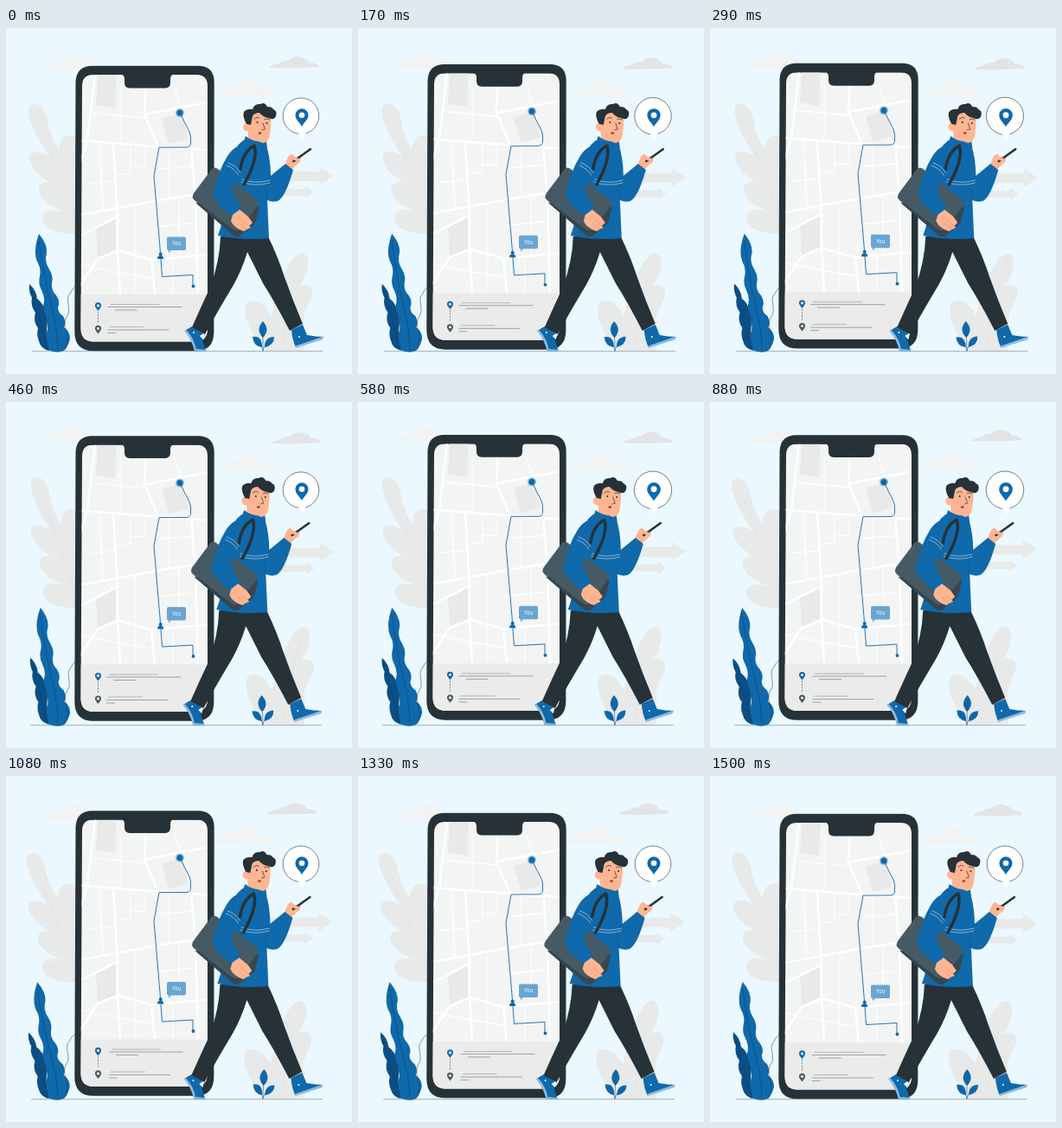
These frames come from a looping animation (400x400 px, 1.54 s). An HTML page:

```html
<!DOCTYPE html>
<html lang="en">
<head>
<meta charset="utf-8">
<title>Walking with a map</title>
<style>
  html, body { margin: 0; width: 100%; height: 100%; overflow: hidden; background: #ebf8ff; }
  svg { display: block; width: 100%; height: 100%; }
  .grey { fill: #e8e9e9; }
  .pale { fill: #f2f3f3; }
  .dark { fill: #263238; }
  .blue { fill: #0f69aa; }
  .skin { fill: #ffb592; }
  .line { fill: none; stroke: #263238; stroke-width: .7; stroke-linecap: round; stroke-linejoin: round; }
  .white { stroke: #fff; }
  .vein { fill: none; stroke: #dcdfe0; stroke-width: .5; }
</style>
</head>
<body>
<svg viewBox="0 0 400 400">
  <defs>
    <clipPath id="screen"><path d="M101 54H220Q233 54 233 67V347Q233 362.500 219 362.500H101Q86.500 362.500 86.500 347L88 67Q88 54 101 54Z"/></clipPath>
    <path id="pin" d="M0 10C-3 5-7.5 2-7.5-3a7.5 7.5 0 0 1 15 0C7.5 2 3 5 0 10ZM0-6.3a3.3 3.3 0 1 0 0 6.600a3.300 3.300 0 0 0 0-6.600Z" fill-rule="evenodd"/>
  </defs>

  <g class="grey">
    <path id="cloudLeft" class="pale" d="M40 47.500Q48 41 58 40Q62 35 70 36Q78 28 88 32Q94 33 96 39Q104 40 105 45L92 48Z"/>
    <path id="cloudMid" class="pale" d="M243 79Q247 73 255 72Q258 65 267 65Q273 57 283 60Q292 61 295 69Q309 70 314 77Q290 80 243 79Z"/>
    <path id="cloudRight" d="M304 46Q307 42 316 41Q320 37 326 38Q333 31 341 34Q347 34 350 40Q360 40 362 45Q335 47 304 46Z" fill="#e2e4e5"/>
    <path id="arrows" d="M300 166H362V160L378 171L362 182V177H300ZM300 186H346V183L355.500 190L346 197V194H300Z"/>
    <g id="leafBack">
      <path d="M90 238C62 240 38 232 43 217C46 208 60 211 68 212C46 206 34 191 39 182C45 174 60 181 68 185C44 179 23 158 28 147C33 140 44 145 51 149C36 130 22 100 27 91C32 84 44 90 47 103C50 119 54 130 61 141C62 128 70 121 80 125L90 150Z"/>
      <path class="vein" d="M34 96Q51 145 85 232M34 150Q54 161 63 179M45 186Q66 197 76 210M48 219Q68 222 83 232"/>
    </g>
    <g id="leafRight">
      <path d="M300 373C280 352 271 324 280 317C292 311 300 322 307 333C312 310 325 262 342 260C354 262 350 286 338 299C350 292 358 301 353 312C348 324 342 331 345 345L345 373Z"/>
      <path class="vein" d="M342 266Q326 310 320 370M350 302Q333 318 324 345M284 322Q299 350 317 370"/>
    </g>
  </g>

  <path class="line" id="ground" stroke-opacity=".55" d="M30 373.700H366"/>

  <g id="phone">
    <path class="dark" d="M100 43.700H222Q240.700 43.700 240.700 63L240.300 352Q240 373.300 219 373.300H101Q79.300 373.300 79.300 351L80.500 63Q81 43.700 100 43.700Z"/>
    <g clip-path="url(#screen)">
      <path d="M86 54H233V363H86Z" fill="#f3f4f4"/>
      <path d="M106 54H128L126 93L104 89ZM180 105L203 98L215 127L188 134ZM104 231L127 219V258L106 265Z" fill="#e8e9e9"/>
      <path class="line white" style="stroke-width:2.600" d="M103 54L94 130L86 155M86 130L174 137L233 141M124 133L129 220V256L132 308M86 216L172 200L233 190M86 240L129 218M129 257L168 268L233 262M162 54L160 100L176 137M160 100L233 86M86 297L106 267L129 257M214 135L219 200L222 308M168 268L172 308"/>
      <path class="line white" style="stroke-width:1.200" d="M132 69V133M98 98L160 104M144 136V168L126 170M144 160H160V138M176 163L216 160M188 140V198M150 204V262M172 230L220 225M200 194V264M195 70L204 97L214 135M95 180L127 177M108 132L112 211M86 274L129 283L172 290M193 265V308M150 264V306"/>
      <path d="M86 308H233V363H86Z" fill="#ebebeb"/>
    </g>
    <path class="dark" d="M132 53H195Q190 54 190 59V63Q190 69.500 184 69.500H143Q137 69.500 137 63V59Q137 54 132 53Z"/>
    <path class="line" style="stroke:#0f69aa;stroke-width:.9" d="M201 98L212.500 121Q214 125 213.500 134Q213 138 208 138H177L171 171L178.500 260L180.500 287.500L216 285.500V298"/>
    <circle class="blue" cx="201" cy="98" r="5" opacity=".4"/>
    <circle class="blue" cx="201" cy="98" r="3.500"/>
    <circle class="blue" cx="216.500" cy="298.500" r="1.900"/>
    <g class="blue"><circle cx="178.700" cy="261.500" r="2"/><path d="M175 267Q175 263 178.700 263Q182 263 182.300 267Z"/></g>
    <path fill="#6aa5d1" d="M188 241.500H206Q208 241.500 208 243.500V255Q208 257 206 257H191L188 260V257Q186 257 186 255V243.500Q186 241.500 188 241.500Z"/>
    <text x="197" y="251.400" font-family="Inter, sans-serif" font-size="5.600" text-anchor="middle" fill="#fff">You</text>
    <use href="#pin" class="blue" transform="translate(106.500 322.300) scale(.47)"/>
    <use href="#pin" transform="translate(106.500 348.800) scale(.47)" fill="#455a64"/>
    <path class="line" style="stroke-width:.5" stroke-dasharray="1.500 2" d="M106.500 328V342"/>
    <g id="notes" class="line" style="stroke-width:.5" opacity=".8">
      <path stroke="#3a6d94" d="M121 319.500H177M120 345.500H159"/>
      <path d="M118 322.500H203M126 326H151M118 349H188M118 352.500H127"/>
    </g>
  </g>

  <g id="plant">
    <path class="blue" d="M38 238Q48 250 47 260Q44 270 50 279Q55 287 53 295Q52 303 58 309Q63 316 60 323Q60 329 66 333Q70 340 67 346Q74 351 74 359Q72 368 67 373Q58 377 49 372Q44 363 47 352Q50 344 45 335Q40 329 43 321Q46 313 41 303Q37 296 39 287Q41 278 36 270Q31 258 38 238Z"/>
    <path fill="#0c4f84" d="M27 296Q35 303 36 313Q44 319 44 327Q49 337 47 349Q46 361 50 373Q40 371 38 362Q35 355 37 347Q31 339 34 329Q28 321 30 312Q26 305 27 296Z"/>
    <path class="line" style="stroke:#0a3c68;stroke-width:.5" d="M38 246Q44 290 52 320T60 372M29 303Q40 337 48 372"/>
    <path class="line" style="stroke-width:.5" d="M68 372C77 357 63 346 70 334C77 325 67 314 74 307Q76 302 80 299"/>
  </g>
  <g id="sprout" class="blue">
    <path d="M297 339Q306 349 297 358Q288 349 297 339ZM285 357Q296 355 296 369Q286 368 285 357ZM310 357Q310 367 299 369Q299 357 310 357Z"/>
    <path class="line" style="stroke:#0c4f84;stroke-width:.5" d="M297 346V373M288 360Q296 365 297 373M307 361Q298 366 297 373"/>
  </g>

  <g id="man">
    <path class="blue" d="M206.500 350L215 345L230 354L227 361L231 373.500H218Q215 360 206.500 350ZM330 349L343 343L348 355Q358 357 367 357L365 360L335 369Q331 361 330 349Z"/>
    <path fill="#fff" d="M224 356L230 352L228 360Z"/>
    <path fill="#8dbbe0" d="M206.500 350L208.500 349Q218 360 219.500 371L231 372V373.500H218Q215 361 206.500 350ZM335 367.500L367 356.500L366 360L335 370Z"/>
    <g fill="#fff"><circle cx="217" cy="352" r="1"/><circle cx="339" cy="357" r="1"/></g>
    <path class="dark" d="M248 241H303Q315 266 322 288Q332 316 343 342L328 350Q311 317 297 295L279 259Q273 279 263 297Q245 327 230 354L215 346Q226 321 236 300Q247 270 248 241Z"/>

    <g id="hand">
      <path class="skin" d="M321 161L325 152Q327 145 331 146L334 149L341 150L340 155L335 159L330 164Z"/>
      <path class="line" style="stroke-width:2.600" d="M332.500 154L352 140"/>
      <path class="skin" d="M333 149.500L340 151L337 153.500L333 153Z"/>
    </g>
    <path class="blue" d="M274 130L300 133Q306 150 306 171L323 157L332 164Q323 196 314 200Q308 202 302 199L304 243Q275 246 245 240Q252 222 252 202L258 158Q263 138 274 130Z"/>
    <path class="line" style="stroke:#0c4f84;stroke-width:.5" d="M306 171L299 181M302 199L300 186"/>
    <path class="line white" style="stroke-width:.5" d="M273 175Q288 181 305 176M272 178Q288 184 305 179"/>

    <path class="skin" d="M280 112L280 129Q290 138 299 132L299 122Z"/>
    <path class="blue" d="M277 125Q287 133 301 131L302 139Q287 141 274 133Z"/>
    <path class="skin" d="M282 97Q294 94 306 102Q307 112 305 123Q304 132 297 133Q286 130 282 119Q275 121 274 114Q275 108 281 111Z"/>
    <path class="dark" d="M278 111Q273 102 275 97Q279 93 285 94Q287 87 294 88Q299 85 302 91Q308 91 309 94Q314 96 312 102Q310 107 303 104Q297 103 293 98Q287 98 285 102L283 112Z"/>
    <path class="line" d="M287 105Q290 102 293 104M299 105.500Q302 104 305 106M297 110L299.500 117L296 118"/>
    <g class="dark"><circle cx="290.500" cy="109" r="1"/><circle cx="301.500" cy="110" r="1"/></g>
    <ellipse cx="293.500" cy="121.500" rx="1.800" ry="1.300" fill="#8d3f3a"/>

    <path fill="#37474f" d="M219 202L262 239Q266 243 271 240L288 226L293 207Z"/>
    <path fill="#455a64" d="M217 191L238 163Q241 160 245 163L290 198Q294 202 291 207L271 233Q267 237 262 233L218 199Q214 196 217 191Z"/>
    <path class="line" style="stroke-width:.5" d="M218 199L262 234Q267 237 271 233L291 206"/>
    <path class="blue" d="M268 137Q276 144 274 157Q271 174 261 187L272 209L262 218Q242 204 239 192Q245 166 256 148Q261 140 268 137Z"/>
    <path class="line" style="stroke-width:3.500" d="M271 163Q274 143 287 136Q292 151 275 181"/>
    <path class="line white" style="stroke-width:.5" d="M257 156Q266 159 271 167M255 159Q264 162 269 170"/>
    <path class="skin" d="M262 216L270 210L280 218L285 225L281 229Q285 231 280 232L275 235Q263 231 260 223Z"/>
    <path class="line" style="stroke:#d97f66;stroke-width:.5" d="M273 222L281 229M270 226L278 233"/>
  </g>

  <g id="bubble">
    <circle cx="341" cy="101.700" r="20.800" fill="#fff" stroke="#263238" stroke-width=".6"/>
    <path d="M337 120.500L343 129L347 120Z" fill="#fff"/>
    <use href="#pin" class="blue" x="342" y="103.800"/>
  </g>
</svg>
<script>
const LOOP = 1540;
const move = (id, transform) => document.getElementById(id).setAttribute('transform', transform);
const shift = (id, x, y = 0) => move(id, `translate(${x} ${y})`);
const turn = (id, angle, x, y) => move(id, `rotate(${angle} ${x} ${y})`);

// Linear value between [time, value] pairs
function tween(keys, t) {
  const i = keys.findIndex(([time]) => time > t);
  const [t0, a] = keys[i - 1], [t1, b] = keys[i];
  return a + (b - a) * (t - t0) / (t1 - t0);
}

const lift = [[0, 0], [720, -7], [1440, 0], [LOOP, 0]];
const stride = [[0, 0], [290, 1.3], [460, -1.7], [710, -2.8], [1080, -.6], [1330, -.4], [LOOP, 0]];
const pulse = [[0, 1], [290, 1.035], [460, 1], [710, 1.085], [1080, 1], [LOOP, 1]];

function draw(now) {
  const t = now % LOOP;
  const wave = Math.sin(t / LOOP * 2 * Math.PI);
  const walk = tween(stride, t);

  shift('phone', 0, tween(lift, t));
  shift('notes', -1.5 * wave);
  shift('man', walk);
  shift('ground', walk * .8);
  move('bubble', `translate(341 101.7) scale(${tween(pulse, t)}) translate(-341 -101.7)`);
  shift('cloudLeft', 0, -2 * wave);
  shift('cloudMid', 3 * wave, 1.5 * wave);
  shift('cloudRight', 2.5 * wave, 2 * wave);
  shift('arrows', wave, 2.5 * wave);
  turn('leafBack', 1.1 * wave, 88, 236);
  turn('leafRight', 1.2 * wave, 312, 373);
  turn('plant', .8 * wave, 57, 373);
  turn('sprout', -2.5 * wave, 297, 373);
  requestAnimationFrame(draw);
}
draw(0);
</script>
</body>
</html>
```
